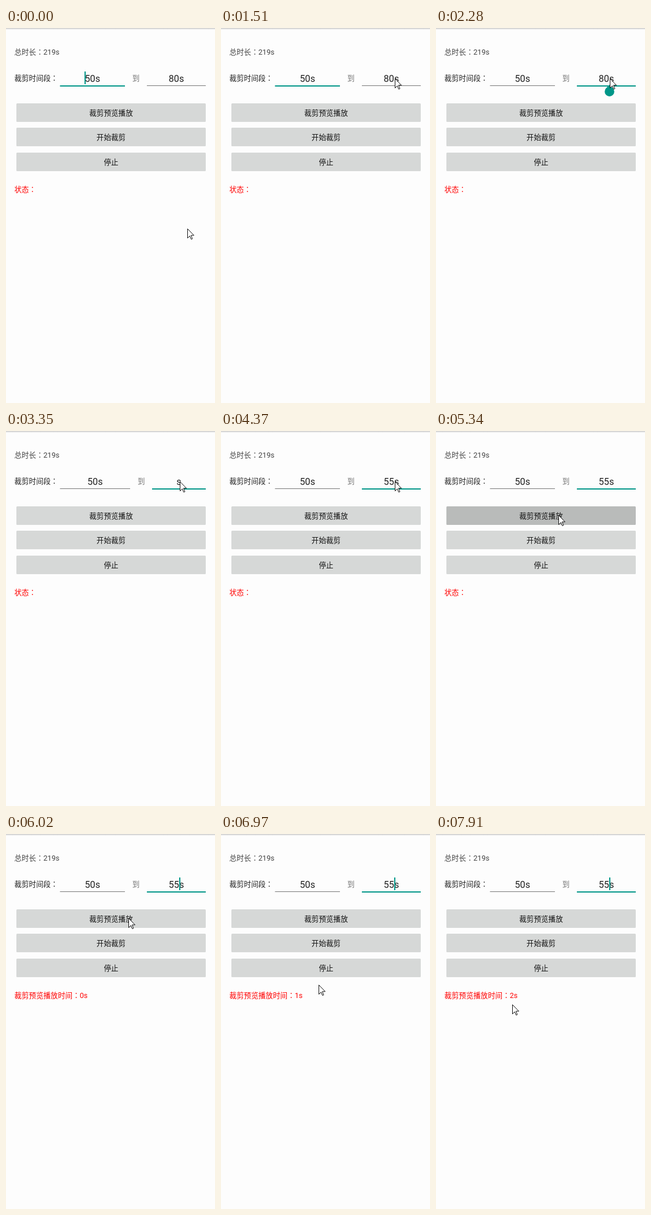
An HTML page for the animation above (8 s loop, 362 px wide and 647 px high).

```html
<!DOCTYPE html>
<html lang="zh-CN">
<head>
<meta charset="utf-8">
<title>裁剪</title>
<style>
  html, body { margin: 0; width: 100%; height: 100%; overflow: hidden; background: #fdfdfd; }
  svg { display: block; width: 362px; height: 647px; }
  text { font: 12.6px Roboto, "Noto Sans CJK SC", "Noto Sans CJK", sans-serif; fill: #222; }
  .colon { font-family: "Noto Sans CJK JP", "Noto Sans CJK", sans-serif; }
  .field { font-size: 16.2px; fill: #212121; }
  .mid { text-anchor: middle; }
  .btn rect { fill: #d6d8d7; }
  .btn text { fill: #111; }
  .btn.down rect { fill: #b9bbba; }
  .line { fill: #777; }
  .line.on, .teal { fill: #009688; }
  .soft { fill: #444; }
  .faint { fill: #757575; }
  .status { fill: #f00; }
</style>
</head>
<body>
<svg viewBox="0 0 362 647">
  <defs>
    <linearGradient id="shade" x2="0" y2="1">
      <stop offset="0" stop-color="#c4c4c4"/>
      <stop offset="1" stop-color="#fdfdfd"/>
    </linearGradient>
  </defs>
  <rect width="362" height="647" fill="#fdfdfd"/>
  <rect width="362" height="3" fill="url(#shade)"/>

  <text x="14.4" y="45.6" class="soft">总时长<tspan class="colon" lang="ja">：</tspan>219s</text>
  <text x="14.4" y="91.4">裁剪时间段<tspan class="colon" lang="ja">：</tspan></text>

  <rect id="line1" class="line"/>
  <text id="from" class="field mid" y="93">50s</text>
  <text id="to" class="faint" y="91.4">到</text>
  <rect id="line2" class="line"/>
  <text id="until" class="field mid" y="93"></text>

  <g id="buttons"></g>

  <text x="14.4" y="283.3" class="status"><tspan id="state"></tspan><tspan class="colon" lang="ja">：</tspan><tspan id="count"></tspan></text>

  <rect id="caret" class="teal" y="75" width="2" height="22"/>
  <path id="handle" class="teal" d="M0 0h8.3a8.3 8.3 0 1 1-8.3 8.3z" transform="translate(300.5 98) rotate(45)"/>
  <path id="mouse" d="M.5 .5V16.5L4.3 12.8 6.8 18.5 8.9 17.7 6.5 11.8H11.5Z" fill="#fff" stroke="#111" stroke-linejoin="round"/>
</svg>
<script>
const LOOP = 8000, LEFT = 93.5, RIGHT = 346, DIGIT = 9.1, S_WIDTH = 8.36;
const PRESS = 1660, FOCUS = 1780, COUNT = 6020, SECOND = 945, MOVE_STEPS = 6;
const $ = id => document.getElementById(id);

const HOME = { x: 314, y: 346 };
const moves = [
  { start: 800, end: 1510, via: { x: 301, y: 210 }, to: { x: 301, y: 87 } },
  { start: 4510, end: 5200, via: { x: 240, y: 188 }, to: { x: 212, y: 145 } },
  { start: 6710, end: 7360, via: { x: 165, y: 300 }, to: { x: 132, y: 294 } }
];
const edits = [
  { time: 2710, text: "8" }, { time: 2830, text: "" },
  { time: 3640, text: "5" }, { time: 3780, text: "55" }
];

const within = (t, a, b) => t >= a && t < b;
const show = (el, on) => el.setAttribute("visibility", on ? "visible" : "hidden");
const bezier = (a, b, c, u) => (1 - u) ** 2 * a + 2 * u * (1 - u) * b + u * u * c;

function set(el, attrs) {
  for (const k in attrs) el.setAttribute(k, attrs[k]);
}

// The pointer follows a curve in a few visible jumps.
function pointer(t) {
  let pos = HOME;
  for (const { start, end, via, to } of moves) {
    if (t < start) break;
    const step = Math.floor((t - start) / (end - start) * (MOVE_STEPS - 1) + 1e-6) + 1;
    const u = Math.min(step / MOVE_STEPS, 1);
    pos = {
      x: Math.round(bezier(pos.x, via.x, to.x, u)),
      y: Math.round(bezier(pos.y, via.y, to.y, u))
    };
  }
  return pos;
}

function underline(el, x, end, on) {
  el.classList.toggle("on", on);
  set(el, { x, width: end - x, y: 99, height: on ? 2 : 1 });
}

function drawFields(t) {
  const edit = edits.findLast(e => e.time <= t);
  const digits = edit ? edit.text : "80";
  const shift = (2 - digits.length) * DIGIT / 2;
  const end1 = 206 + shift, start2 = 244 + shift;
  const mid1 = (LEFT + end1) / 2, mid2 = (start2 + RIGHT) / 2;
  const second = t >= FOCUS;

  underline($("line1"), LEFT, Math.round(end1), !second);
  underline($("line2"), Math.round(start2), RIGHT, t >= PRESS);
  set($("from"), { x: mid1 });
  set($("to"), { x: 218.8 + shift });
  set($("until"), { x: mid2 });
  $("until").textContent = digits + "s";

  // Blinking restarts with each focus change or key press.
  const blinkStart = edit ? edit.time : second ? FOCUS : -90;
  const caretX = second ? mid2 + (digits.length * DIGIT - S_WIDTH) / 2 : 136;
  set($("caret"), { x: Math.round(caretX) });
  show($("caret"), (t - blinkStart) % 1000 < 500);
  show($("handle"), within(t, 1970, edits[0].time));
}

function draw(t) {
  drawFields(t);
  $("buttons").firstChild.classList.toggle("down", within(t, 5340, 5490));

  const counting = t >= COUNT;
  $("state").textContent = counting ? "裁剪预览播放时间" : "状态";
  $("count").textContent = counting ? Math.floor((t - COUNT) / SECOND) + "s" : "";

  const { x, y } = pointer(t);
  set($("mouse"), { transform: `translate(${x} ${y})` });
}

$("buttons").innerHTML = ["裁剪预览播放", "开始裁剪", "停止"].map((label, i) => {
  const y = Math.floor(130 + 42.5 * i);
  return `<g class="btn"><rect x="18" y="${y}" width="328" height="32" rx="1.5"/>` +
    `<text class="mid" x="182" y="${y + 21}">${label}</text></g>`;
}).join("");

const start = performance.now();
function tick() {
  draw((performance.now() - start) % LOOP);
  requestAnimationFrame(tick);
}
tick();
</script>
</body>
</html>
```
